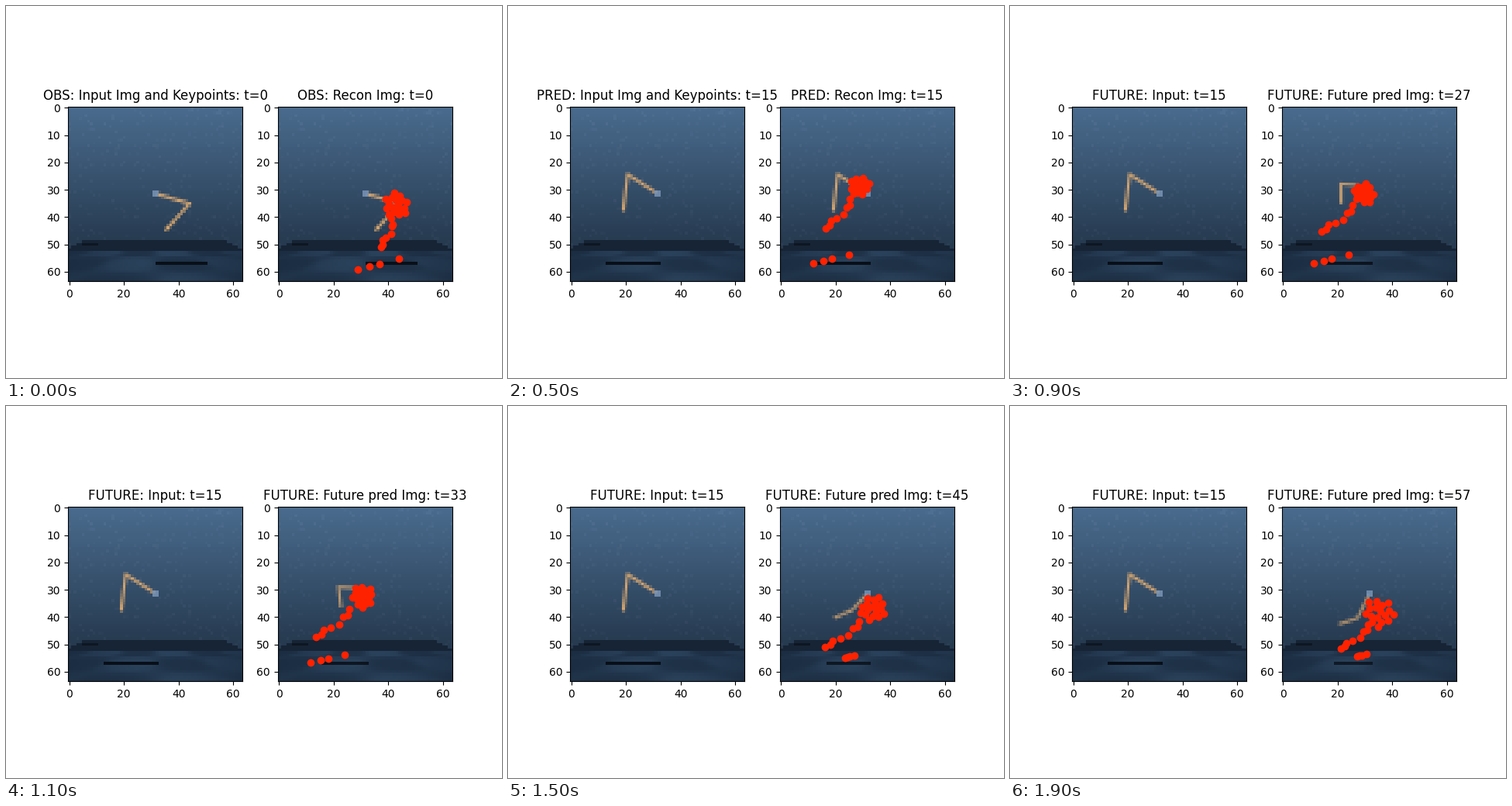
These frames come from a looping animation (640 by 480 pixels, 2000 ms). A matplotlib script:

```python
import numpy as np
import matplotlib.pyplot as plt
from matplotlib.animation import FuncAnimation

FRAMES, STEP, INTERVAL = 20, 3, 100
LAST_SEEN = 5
N = 64
PIVOT = np.array([31.5, 31.5])
LINK = 13.0
TAN = np.array([208, 163, 112])
BLUE = np.array([112, 146, 186])
GHOST = np.array([62, 66, 76])
SHADOW = np.array([9, 15, 24])
ROWS, COLS = np.mgrid[0:N, 0:N].astype(float)

# Poses at the key frames: link angles in degrees (y down), dot group centres
KEYS = [0, 3, 5, 7, 11, 15, 19]
UPPER = [16, 147.5, 212.5, 204, 193, 133, 116]
LOWER = [132, 10, 97, 95, 84, 156, 162]
HEAD = [(42.7, 35.5), (29.5, 39), (28.7, 28.5), (28.8, 30), (30.7, 32.5), (33.5, 37), (35, 38.5)]
BODY = [(40.2, 45.5), (22.5, 43), (22, 38.5), (21, 38.5), (21, 42), (23.7, 46), (27.3, 47)]
FOOT = [(36, 57.3), (25, 55.2), (18, 55.5), (17, 55.5), (17.5, 55.3), (25, 54.5), (28.7, 54)]

RNG = np.random.default_rng(8)
SCATTER = RNG.normal(0, 0.7, (8, 2))


def tween(i, values):
    return np.array([np.interp(i, KEYS, v) for v in np.transpose(values)])


def keypoints(i):
    """A round cloud at the arm, a trail below it and a row on the floor."""
    head, body, foot = (tween(i, v) for v in (HEAD, BODY, FOOT))
    k = np.arange(17)
    radius = np.interp(i, [0, 3, 11, 19], [4.7, 3.6, 4.2, 5.6])
    turn = k * np.pi * (3 - np.sqrt(5)) + 0.3 * i
    reach = radius * np.sqrt((k + 0.5) / k.size)
    cloud = head + reach[:, None] * np.column_stack([np.cos(turn), np.sin(turn)])

    along = np.linspace(-0.65, 0.55, len(SCATTER))[:, None]
    trail = body + along * (head - body) + SCATTER

    width = np.interp(i, [0, 3, 5, 11, 15], [8, 3, 7, 6.5, 1.8])
    dx = width * np.array([-0.9, -0.35, 0.1, 1])
    floor = foot + np.column_stack([dx, -0.25 * dx])
    return np.vstack([cloud, trail, floor])


def arm(i):
    """Pivot, middle of the upper link, elbow and tip."""
    a, b = (np.radians(np.interp(i, KEYS, v)) for v in (UPPER, LOWER))
    upper = np.interp(i, [LAST_SEEN, 15, 19], [LINK, 8.2, 10])
    lower = np.interp(i, [LAST_SEEN, 7], [LINK, 6.8])
    bow = np.interp(i, [LAST_SEEN, 7, 15], [0, 1.8, 0])
    elbow = PIVOT + upper * np.array([np.cos(a), np.sin(a)])
    tip = elbow + lower * np.array([np.cos(b), np.sin(b)])
    middle = (PIVOT + elbow) / 2 - [0, bow]
    return np.array([PIVOT, middle, elbow, tip])


def backdrop():
    f = np.clip(ROWS / 50, 0, 1)[..., None]
    img = np.array([74, 107, 142]) * (1 - f) + np.array([38, 57, 79]) * f
    img += ((RNG.random((N, N)) < 0.09) * RNG.uniform(2, 7, (N, N)))[..., None]

    # Soft checkerboard in perspective, darker towards the sides
    depth = 1 / np.maximum(ROWS - 45, 1)
    u = (COLS - 31.5) * depth / 1.55
    tile = -np.sin(np.pi * u) * np.sin(np.pi * (depth / 0.038 + 0.3))
    light = np.exp(-((COLS - 31.5) / 34) ** 2)
    mix = ((0.5 + 0.25 * np.tanh(3 * tile)) * light)[..., None]
    floor = np.array([25, 42, 62]) * (1 - mix) + np.array([48, 74, 101]) * mix
    floor[:53] = (22, 36, 53)
    inside = (ROWS >= 49) & (np.abs(COLS - 31.2) <= 26.5 + 2 * (ROWS - 49))
    img[inside] = floor[inside]
    img[50, 5:11] = (13, 22, 33)
    return img


def paint(img, cover, color):
    cover = cover[..., None]
    return img * (1 - cover) + color * cover


def stroke(points, half):
    """Coverage of a polyline on the pixel grid."""
    best = np.full((N, N), 99.0)
    for p, q in zip(points[:-1], points[1:]):
        d = q - p
        s = ((COLS - p[0]) * d[0] + (ROWS - p[1]) * d[1]) / max(d @ d, 1e-9)
        s = np.clip(s, 0, 1)
        best = np.minimum(best, np.hypot(COLS - p[0] - s * d[0], ROWS - p[1] - s * d[1]))
    return np.clip(half + 0.5 - best, 0, 1)


BACK = backdrop()


def scene(path, strength=1.0, ghost=0.0):
    # Higher parts of the arm throw their shadow further out
    spread = 1.44 - 0.028 * (path[:, 1] - 34.5)
    span = PIVOT[0] + spread * (path[:, 0] - PIVOT[0])
    bar = (ROWS == 57) & (COLS >= span.min() - 0.3) & (COLS <= span.max() + 0.8)
    img = paint(BACK, bar * strength, SHADOW)
    trail = np.array([(33, 32), (39, 34)], float)
    img = paint(img, stroke(trail, 0.4) * ghost, GHOST)
    img = paint(img, stroke(path, 0.55) * strength, TAN)
    hub = (np.abs(COLS - 31.5) < 1) & (np.abs(ROWS - 31.5) < 1)
    img = paint(img, hub * 0.8, BLUE)
    return np.clip(img, 0, 255).astype(np.uint8)


def titles(i):
    t = i * STEP
    if i > LAST_SEEN:
        return f"FUTURE: Input: t={LAST_SEEN * STEP}", f"FUTURE: Future pred Img: t={t}"
    mode = "OBS" if t < 8 else "PRED"
    return f"{mode}: Input Img and Keypoints: t={t}", f"{mode}: Recon Img: t={t}"


fig, (left, right) = plt.subplots(1, 2, figsize=(6.4, 4.8), dpi=100)
pic_in = left.imshow(scene(arm(0)))
pic_out = right.imshow(scene(arm(0)))
dots = right.scatter(*keypoints(0).T, color="#ff2200")
for ax in (left, right):
    ax.set_xlim(-0.5, N - 0.5)
    ax.set_ylim(N - 0.5, -0.5)


def draw(i):
    name_in, name_out = titles(i)
    left.set_title(name_in)
    right.set_title(name_out)
    pic_in.set_data(scene(arm(min(i, LAST_SEEN))))
    strength = np.interp(i, [LAST_SEEN, 7, 19], [1, 0.9, 0.78])
    ghost = np.interp(i, [11, 15], [0, 0.6])
    pic_out.set_data(scene(arm(i), strength, ghost))
    dots.set_offsets(keypoints(i))
    return pic_in, pic_out, dots


anim = FuncAnimation(fig, draw, frames=FRAMES, interval=INTERVAL, repeat=True,
                     repeat_delay=0, init_func=lambda: draw(0))
plt.show()
```
